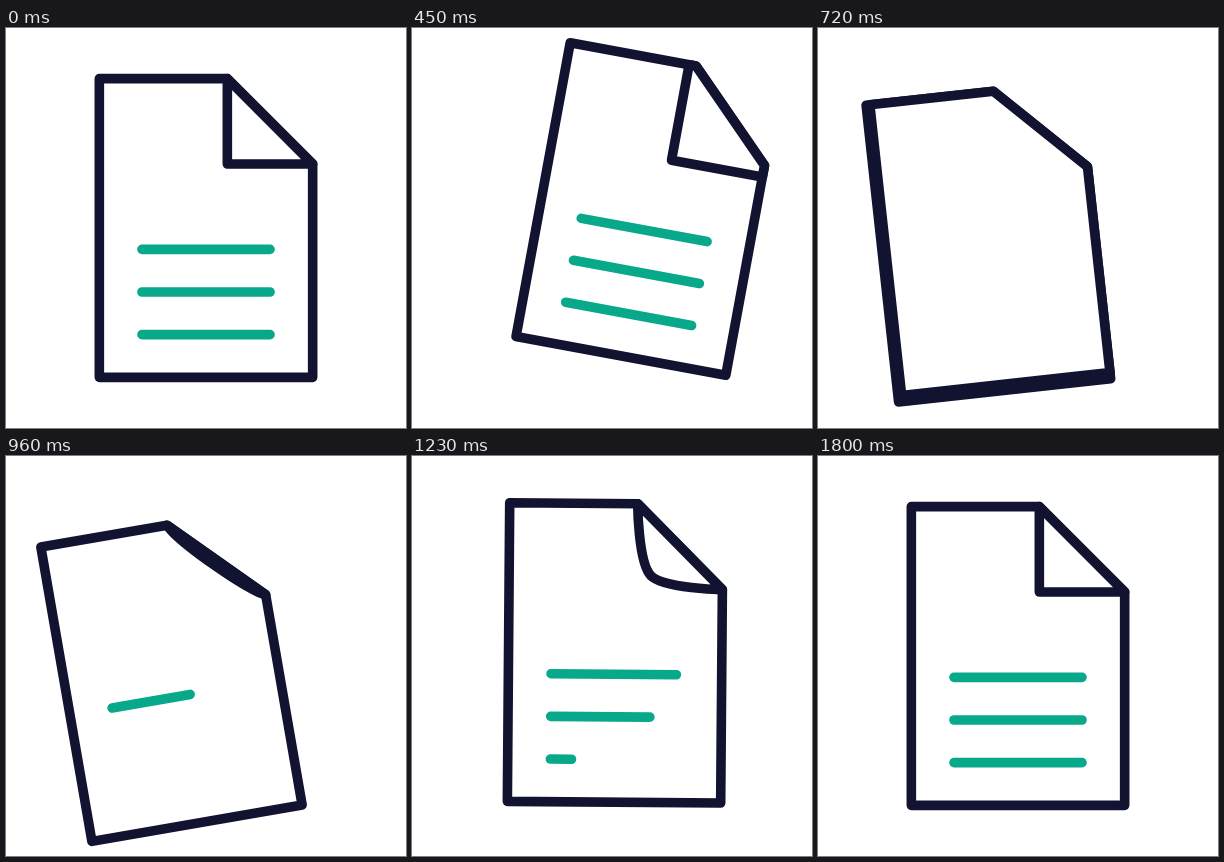
These frames come from a looping animation (400x400 px, 3.86 s). An HTML page:

```html
<!DOCTYPE html>
<html lang="en">
<head>
<meta charset="utf-8">
<title>Document page turn</title>
<style>
  html, body { margin: 0; width: 100%; height: 100%; overflow: hidden; background: #fff; }
  svg { display: block; width: 100%; height: 100%; }
  path { stroke-width: 9.6; stroke-linecap: round; stroke-linejoin: round; }
  .ink { stroke: #121331; fill: #fff; }
  .rule { stroke: #08a88a; fill: none; }
</style>
</head>
<body>
<svg viewBox="0 0 400 400">
  <g id="page">
    <path class="ink" d="M93.33 50.67H221.33L306.67 136V349.33H93.33Z"/>
    <path class="rule"/>
    <path class="rule"/>
    <path class="rule"/>
    <path class="ink" id="fold"/>
  </g>
</svg>
<script>
const LOOP = 3860, STEP = 30;
const PEEL_START = 395, PEEL_END = 760;
const RULE_START = 795, RULE_GAP = 200, RULE_TIME = 600;
const LEFT = 93.33, TOP = 50.67, RIGHT = 306.67, BOTTOM = 349.33;
const FOLD_X = 221.33, FOLD_Y = 136;

const page = document.getElementById('page');
const fold = document.getElementById('fold');
const rules = document.querySelectorAll('.rule');

const clamp = v => Math.min(1, Math.max(0, v));
const mix = (a, b, p) => a + (b - a) * p;
const easeInOut = p => (1 - Math.cos(Math.PI * p)) / 2;
const easeOut = p => 1 - (1 - p) ** 3;

// Smooth monotone curve through [time, value] keys, level at both ends.
function track(keys) {
  const chord = i => (keys[i + 1][1] - keys[i][1]) / (keys[i + 1][0] - keys[i][0]);
  const slopes = keys.map((_, i) => {
    if (i === 0 || i === keys.length - 1) return 0;
    const a = chord(i - 1), b = chord(i);
    return a * b <= 0 ? 0 : 2 * a * b / (a + b);
  });
  return t => {
    if (t <= keys[0][0]) return keys[0][1];
    const i = keys.findIndex(k => k[0] > t) - 1;
    if (i < 0) return keys[keys.length - 1][1];
    const [t0, v0] = keys[i], [t1, v1] = keys[i + 1];
    const d = t1 - t0, s = (t - t0) / d, r = 1 - s;
    return r * r * ((1 + 2 * s) * v0 + s * d * slopes[i])
         + s * s * ((1 + 2 * r) * v1 - r * d * slopes[i + 1]);
  };
}

const angle = track([[0, 0], [400, 10.9], [450, 10.45], [540, 6.2], [720, -6.25], [885, -10.4],
  [960, -9.84], [1080, -6.7], [1230, 0.45], [1395, 4.9], [1530, 3.58], [1620, 2.05], [1800, 0]]);
const shiftX = track([[0, 0], [390, 39.4], [450, 36], [540, 13.4], [720, -29.6], [860, -36.3],
  [960, -34.5], [1080, -20.8], [1230, 3.2], [1380, 14], [1530, 8.75], [1620, 4.3], [1800, 0]]);
const shiftY = track([[0, 0], [390, -21.4], [450, -19], [540, -9], [720, 14], [860, 20.4],
  [960, 20], [1080, 11.4], [1230, -3.1], [1380, -9], [1530, -5.4], [1620, -3], [1800, 0]]);
const unfold = track([[870, 0], [960, 0.09], [1230, 0.68], [1530, 0.95], [1740, 1]]);

// The corner flap travels over the whole sheet.
function peelPath(t) {
  const p = easeInOut(clamp((t - PEEL_START) / (PEEL_END - PEEL_START)));
  const x = mix(FOLD_X, LEFT, p), y = mix(FOLD_Y, BOTTOM, p);
  return `M${x} ${TOP}V${y}H${RIGHT}V${FOLD_Y}L${FOLD_X} ${TOP}Z`;
}

// A new flap bulges out of the cut corner and sharpens.
function bulgePath(t) {
  const p = unfold(t), h = 40 * (1 - p);
  const x = mix((FOLD_X + RIGHT) / 2, FOLD_X, p);
  const y = mix((TOP + FOLD_Y) / 2, FOLD_Y, p);
  return `M${FOLD_X} ${TOP}C${FOLD_X} ${TOP} ${x - h} ${y - h} ${x} ${y}` +
         `C${x + h} ${y + h} ${RIGHT} ${FOLD_Y} ${RIGHT} ${FOLD_Y}Z`;
}

function draw(t) {
  const turned = t >= PEEL_END;
  page.setAttribute('transform',
    `translate(${shiftX(t)} ${shiftY(t)}) rotate(${angle(t)} 200 200)`);
  fold.setAttribute('d', turned ? bulgePath(t) : peelPath(t));
  rules.forEach((rule, i) => {
    const grown = easeOut(clamp((t - RULE_START - i * RULE_GAP) / RULE_TIME));
    const length = 128 * (turned ? grown : 1);
    rule.setAttribute('d', length ? `M136 ${221.33 + i * 42.67}h${length}` : '');
  });
}

function tick(now) {
  const t = now % LOOP;
  draw(Math.floor((t + 1) / STEP) * STEP);
  requestAnimationFrame(tick);
}
draw(0);
requestAnimationFrame(tick);
</script>
</body>
</html>
```
